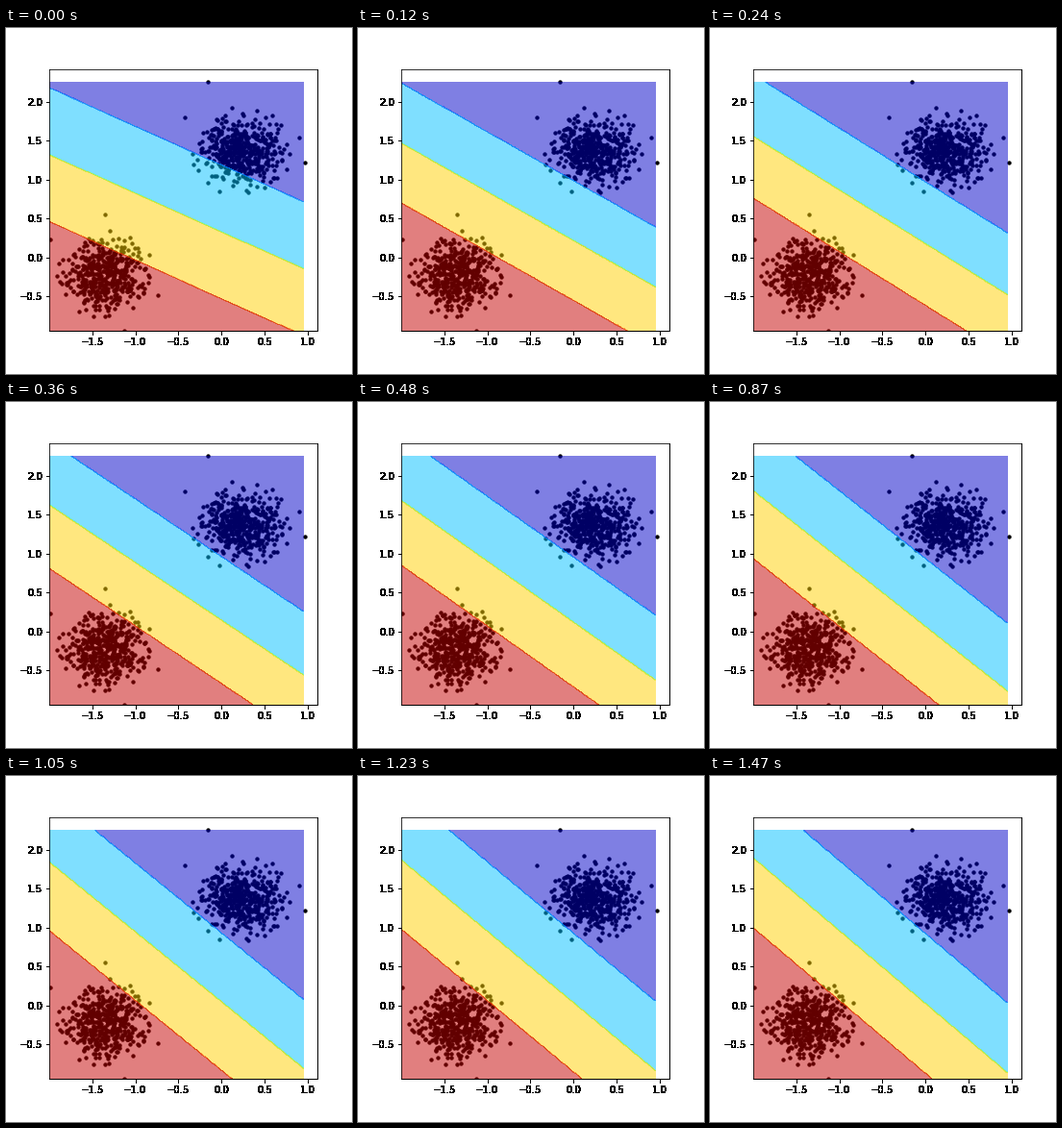
These frames come from a looping animation (360x360 px, 1.5 s). A matplotlib script:

```python
import numpy as np
import matplotlib.pyplot as plt
from matplotlib.animation import FuncAnimation

FRAMES, INTERVAL = 50, 30
X_MIN, X_MAX = -1.998, 0.950
Y_MIN, Y_MAX = -0.942, 2.254
STEP = 0.01
EXTREMES = [(-0.16, 2.26), (0.968, 1.22), (0.90, 1.54), (-0.43, 1.80),
            (-1.99, 0.23), (-1.35, 0.55), (-0.74, -0.48), (-1.13, -0.94)]

rng = np.random.default_rng(4)


def cluster(center, spread, count=470, reach=2.65):
    """Normal cloud cut off at `reach` standard deviations."""
    unit = rng.normal(size=(2 * count, 2))
    unit = unit[np.hypot(*unit.T) < reach][:count]
    return np.array(center) + unit * spread


def boundaries(n):
    """Slope, height at the left edge and spacing of the three lines."""
    slow, fast = np.exp(-0.0495 * n), np.exp(-n)
    slope = -(0.974 - 0.421 * slow - 0.056 * fast)
    middle = 1.951 - 0.581 * slow - 0.046 * fast
    gap = 0.915 - 0.179 * slow + 0.124 * fast
    return slope, middle, gap


def harden(image, dpi):
    """Turn every touched pixel solid black."""
    solid = np.zeros_like(image)
    solid[..., 3] = image[..., 3] > 0
    return solid, 0, 0


fig = plt.figure(figsize=(5, 5), dpi=72)
fig.subplots_adjust(left=0.125, right=0.9, bottom=0.125, top=0.88)
ax = fig.add_subplot()

points = np.vstack([
    cluster((0.23, 1.37), (0.23, 0.215)),
    cluster((-1.36, -0.21), (0.235, 0.215)),
    EXTREMES,
])
ax.scatter(*points.T, s=14, c="black", linewidths=0.5)
ax.set_xlim(X_MIN, 1.113)
ax.set_ylim(Y_MIN, 2.418)

# Ink outside the white plot area has hard edges
for part in (ax.xaxis, ax.yaxis, ax.spines["right"], ax.spines["bottom"]):
    part.set_agg_filter(harden)

gx, gy = np.meshgrid(
    np.linspace(X_MIN, X_MAX, round((X_MAX - X_MIN) / STEP) + 1),
    np.linspace(Y_MIN, Y_MAX, round((Y_MAX - Y_MIN) / STEP) + 1),
)
# Levels sit just below the labels so that each label lies inside a band
levels = np.linspace(0, 3.2, 9) - 1e-6
regions = None


def draw(n):
    global regions
    if regions is not None:
        regions.remove()
    slope, middle, gap = boundaries(n)
    offset = (middle + slope * (gx - X_MIN) - gy) / gap
    label = sum((offset > k).astype(float) for k in (-1, 0, 1))
    regions = ax.contourf(gx, gy, label, levels=levels, cmap="jet", alpha=0.5)
    return []


anim = FuncAnimation(fig, draw, frames=FRAMES, interval=INTERVAL,
                     init_func=lambda: [], repeat=True)
plt.show()
```
